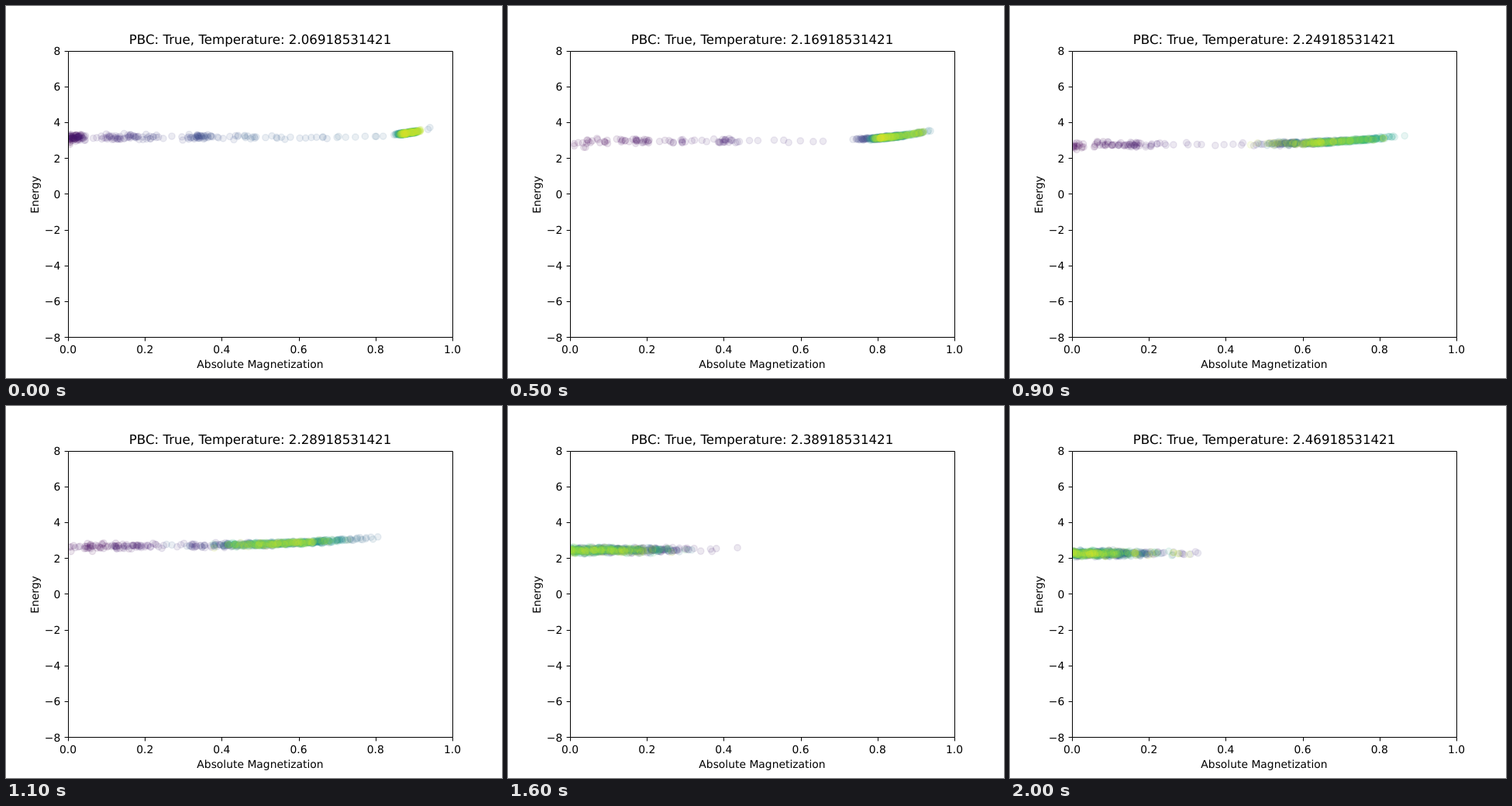
Write an HTML page that moves like this. It is 640 px wide and 480 px high and loops after 2.1 s.

```html
<!DOCTYPE html>
<html lang="en">
<head>
<meta charset="utf-8">
<title>Energy against magnetization</title>
<style>
  html, body { margin: 0; width: 100%; height: 100%; overflow: hidden; background: #fff; }
  svg { display: block; width: 640px; height: 480px; }
  text { font: 13.89px "DejaVu Sans", sans-serif; text-rendering: geometricPrecision; }
  #title { font-size: 16.67px; }
  #axes { fill: none; stroke: #000; }
  #points { stroke-width: 1.39; fill-opacity: .1; stroke-opacity: .1; }
</style>
</head>
<body>
<svg viewBox="0 0 640 480">
  <clipPath id="plot"><rect x="80" y="57.6" width="496" height="369.6"/></clipPath>
  <g clip-path="url(#plot)"><g id="points"></g></g>
  <path id="axes"/>
  <g id="labels"></g>
  <text id="title" x="328" y="49" text-anchor="middle"></text>
  <text x="328" y="467" text-anchor="middle">Absolute Magnetization</text>
  <text transform="translate(42 243.5) rotate(-90)" text-anchor="middle">Energy</text>
</svg>
<script>
const STEP_MS = 100, STEPS = 21, SAMPLES = 700;
const MEMORY = .93;  // correlation between consecutive samples
const $ = id => document.getElementById(id);
const px = m => 80 + 496 * m;
const py = e => 242.4 - 23.1 * e;

const viridis = ["440154", "46327e", "365c8d", "277f8e", "1fa187", "4ac16d", "a0da39", "fde725"]
  .map(hex => [0, 2, 4].map(i => parseInt(hex.slice(i, i + 2), 16)));

function colour(age) {
  const pos = age * .95 * 7, i = Math.floor(pos);
  return `rgb(${viridis[i].map((c, k) => Math.round(c + (viridis[i + 1][k] - c) * (pos - i)))})`;
}

function randomFrom(seed) {
  return () => {
    seed = (seed + 0x6D2B79F5) | 0;
    let t = Math.imul(seed ^ (seed >>> 15), 1 | seed);
    t ^= t + Math.imul(t ^ (t >>> 7), 61 | t);
    return ((t ^ (t >>> 14)) >>> 0) / 4294967296;
  };
}

// A spin system starts disordered, magnetizes, then fluctuates about equilibrium.
// Warmer steps have a lower equilibrium, and fluctuate most near the transition.
function samples(step) {
  const random = randomFrom(step * 977 + 11);
  const normal = () => (random() + random() + random()) * 2 - 3;
  const equilibrium = .885 - .87 * Math.min(1, step / 15.5) ** 2.6;
  const spread = .155 * Math.exp(step < 14 ? (step - 14) / 6 : (14 - step) / 14);
  const riseEnd = .13 + .2 * Math.exp(-step);
  const lag = 1.5 * spread;
  const baseEnergy = 3.17 - .046 * step;
  const bend = Math.max(3, 12 - .8 * step);
  let drift = 0;

  return Array.from({ length: SAMPLES }, (_, i) => {
    const age = i / SAMPLES, u = age / riseEnd;
    drift = MEMORY * drift + Math.sqrt(1 - MEMORY ** 2) * normal();
    const mean = u < 1
      ? (equilibrium - lag) * (.65 * u ** 1.5 + .35 * u ** 20)
      : equilibrium - lag * Math.exp((riseEnd - age) / .12);
    const m = Math.abs(mean + drift * (u < 1 ? Math.max(.04, spread) : spread));
    const cold = .4 * (1 - step / STEPS) * Math.exp(-age * 150);
    const e = baseEnergy + m ** bend - cold + normal() * .085 * (1 - .75 * m);
    return { m, e, age };
  });
}

function drawAxes() {
  const snap = v => Math.floor(v + .5) + .5;
  const [left, right, top, bottom] = [px(0), px(1), py(8), py(-8)].map(snap);
  let path = `M${left} ${top}H${right}V${bottom}H${left}Z`, labels = "";
  const label = (x, y, anchor, value) =>
    labels += `<text x="${x}" y="${Math.round(y)}" text-anchor="${anchor}">${value}</text>`;
  for (let i = 0; i <= 5; i++) {
    path += `M${snap(px(i / 5))} ${bottom}v4.86`;
    label(px(i / 5), 448, "middle", (i / 5).toFixed(1));
  }
  for (let e = -8; e <= 8; e += 2) {
    path += `M${left} ${snap(py(e))}h-4.86`;
    label(70.3, py(e) + 5.3, "end", String(e).replace("-", "\u2212"));
  }
  $("axes").setAttribute("d", path);
  $("labels").innerHTML = labels;
}

function drawStep(step) {
  $("title").textContent = `PBC: True, Temperature: ${(2.06918531421 + step * .02).toFixed(11)}`;
  $("points").innerHTML = samples(step).map(({ m, e, age }) => {
    const c = colour(age);
    return `<circle cx="${px(m).toFixed(2)}" cy="${py(e).toFixed(2)}" r="4.17" fill="${c}" stroke="${c}"/>`;
  }).join("");
}

let shown = -1;
const start = performance.now();
function tick() {
  const step = Math.floor((performance.now() - start) / STEP_MS) % STEPS;
  if (step !== shown) drawStep(shown = step);
  requestAnimationFrame(tick);
}

drawAxes();
tick();
</script>
</body>
</html>
```
